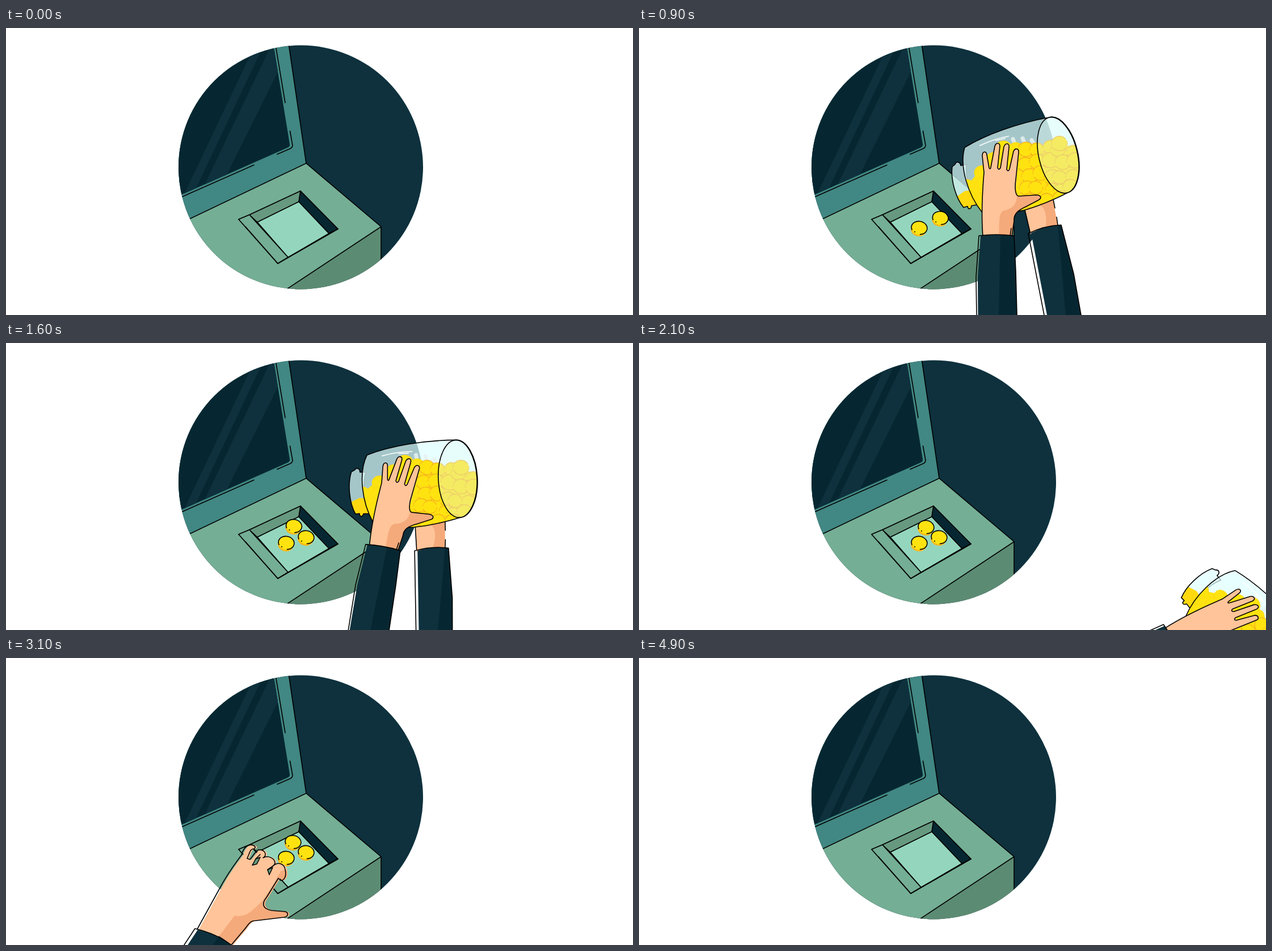
An HTML page for the animation above (5 s loop, 1105 px wide and 507 px high).

```html
<!DOCTYPE html>
<html lang="en">
<head>
<meta charset="utf-8">
<title>Coin tray</title>
<style>
html, body { margin: 0; width: 100%; height: 100%; overflow: hidden; background: #fff; }
svg { display: block; width: 100vw; height: 100vh; }
.ink { fill: none; stroke: #000; stroke-width: 1.6; stroke-linejoin: round; stroke-linecap: round; }
.edge { stroke: #000; stroke-width: 1.5; stroke-linejoin: round; }
</style>
</head>
<body>
<svg id="stage" viewBox="0 0 1105 507"></svg>
<script>
const LOOP = 5000, STEP = 100;
const C = {
  navy: '#0e313d', deep: '#062731', teal: '#418783', top: '#74ae95', side: '#5c8b73',
  wall: '#66997f', floor: '#94d6bd', skin: '#ffc499', shade: '#f5aa7b',
  gold: '#ffe310', rust: '#f5ab21', glass: '#e0ffff'
};
const path = (d, fill, more = '') => `<path d="${d}" fill="${fill}" ${more}/>`;
const ink = (d, more = '') => `<path class="ink" d="${d}" ${more}/>`;

let seed = 7;
const rand = () => (seed = (seed * 16807) % 2147483647) / 2147483647;

const HOLE = 'M410 338L429 330L519 288L585 355L479 416Z';
const SCREEN = 'M290 0H466.5L500 205Q501 209 497 211L290 303Z';

function machine() {
  return `<g clip-path="url(#disc)">
    <rect x="300" y="25" width="440" height="440" fill="${C.navy}"/>
    ${path('M290 0H493.4L529 239L290 353Z', C.teal)}
    ${path(SCREEN, C.deep)}
    <g clip-path="url(#screen)">
      ${path('M440 28L460 18L325 304H309Z', C.navy)}
      ${path('M473 19L500 35L370 298H340Z', C.navy)}
    </g>
    ${path('M529 239L661 351L480 471L290 500V353Z', C.top)}
    ${path('M661 351V480H467Z', C.side)}
    ${ink('M475 30L492 132M500.5 182L505 207Q505 211 501 213L478 223M437 242L305 300.5')}
    ${ink('M497 20L529 239L300 348.5M529 239L661 351L480 471M661 351V480')}
  </g>
  ${path(HOLE, C.deep, 'class="edge"')}
  <path id="back" class="edge" fill="${C.wall}"/>
  <path id="right" class="edge" fill="${C.deep}"/>
  <path id="floor" class="edge" fill="${C.floor}"/>
  <path id="grip" class="edge" fill="${C.top}"/>
  ${ink('M422 351L479 416L585 355')}`;
}

// The outline is open at the lower left, where the milled edge shows
const coin = i => `<g id="coin${i}"><g transform="rotate(12)">
  <ellipse cx="-.5" cy="3.5" rx="13.5" ry="11.5" fill="${C.gold}"/>
  <ellipse cx="-.5" cy="3" rx="12.5" ry="10.8" fill="none" stroke="${C.rust}" stroke-width="3" stroke-dasharray="2.2 1"/>
  <ellipse rx="14" ry="11.5" fill="${C.gold}"/>
  <ellipse class="ink" rx="14" ry="11.5" pathLength="100" stroke-dasharray="20 22 58"/></g>
  <circle cx="-8" cy="7" r="1" fill="#000"/></g>`;

const BODY = 'M574 211C612 188 668 168 723.5 157.7A34.5 68.6 -13 0 1 754.5 291.3' +
  'C735 302 700 316 678 322C650 328 625 327 605 326C580 295 564 245 574 211Z';
const NECK = 'M577 241L567 243C566 236 559 235 557 241L552 245C549 268 558 300 572 317' +
  'L579 315C580 321 585 321 586 314L597 312C583 290 575 265 577 241Z';

function heap() {
  const surface = x => x < 640 ? 208 + (640 - x) * 1.05 : 206;
  const lump = (x, y, r, a) => `<ellipse cx="${x}" cy="${y}" rx="${r}" ry="${r * 0.92}" fill="${C.gold}"
    stroke="${C.rust}" stroke-opacity="${a}" stroke-width="1.8" stroke-dasharray="2 1.4 2 1.4 ${r * 2} 5"/>`;
  let s = path('M556 306L600 252L640 210L700 207L780 209V335H556Z', C.gold);
  for (let x = 584; x < 775; x += 20)
    for (let y = surface(x) + 7; y < 320; y += 23)
      s += lump(x + rand() * 12 - 6, y + rand() * 10 - 4, 12 + rand() * 3, x > 665 ? 0.75 : 0.15);
  return s + lump(741, 204, 14, 0.75);
}

function jar() {
  const base = 'cx="739" cy="224.5" rx="34.5" ry="68.6" transform="rotate(-13 739 224.5)"';
  return `${path(NECK, C.glass, 'fill-opacity=".72"')}
    <g clip-path="url(#neck)">${path('M550 305L574 288L610 284V325H550Z', '#ffd90f')}</g>
    ${ink(NECK)}
    ${path(BODY, C.glass, 'fill-opacity=".72"')}
    <path d="M659 196L664 209M676 195L682 208M692 198L699 210" stroke="#e6f1f0"
      stroke-opacity=".85" stroke-width="7" stroke-linecap="round"/>
    <g clip-path="url(#body)">${heap()}</g>
    <ellipse ${base} fill="#dff8f4" fill-opacity=".36"/>
    <path d="M600 208Q625 196 652 191M628 199L646 195" fill="none" stroke="#fff" stroke-width="1.6"/>
    ${ink(BODY)}<ellipse class="ink" ${base}/>`;
}

const HAND = 'M606 368C603 330 605 290 608 255L605 226C605 217 612 217 613 224L617 247Q619 251 620 246' +
  'L627 209C629 202 636 202 636 209L632 247Q634 252 637 247L643 210C646 202 653 203 652 211' +
  'L648 250Q651 255 653 249L660 218C663 211 670 213 669 220L664 268C662 282 663 296 669 297' +
  'L700 295C709 295 710 301 704 304L683 315C668 322 660 328 661 341L657 368';

function pourArms() {
  const back = `
    ${path('M680 318L690 364L738 350L729 300Z', C.skin)}
    ${path('M706 312Q722 322 716 358L738 350L729 300Z', C.shade)}
    ${ink('M680 322L689 360M730 303L733 318M736 334L738 348')}
    ${path('M691 362Q715 349 744 348L766 434L779 507L852 900H800L719 507Z', C.navy)}
    ${path('M738 348H744L766 434L779 507L852 900H828L752 507Z', C.deep)}
    ${ink('M790 900L714 507L686 363Q714 349 744 348L766 434L779 507L852 900')}`;
  const front = `
    ${path(HAND + 'Z', C.skin)}
    ${path('M634 368C636 345 632 324 645 322C657 319 666 312 666 297L700 295C709 295 710 301 704 304L683 315C668 322 660 328 661 341L657 368Z', C.shade)}
    ${path('M606 340L617 247L620 246L627 209L636 209L632 247L637 247L643 210L652 211L648 250L653 249L660 218L669 220L664 285Z', C.skin)}
    ${ink(HAND)}${ink('M656 354L654 367')}
    ${path('M602 367Q630 363 661 367L664 430L666 507L670 900H602L597.5 507L597 440Z', C.navy)}
    ${path('M637 365L661 367L664 430L666 507L670 900H632L634 507Z', C.deep)}
    ${ink('M600 900L595 507L594 440L599 367Q630 363 661 367L664 430L666 507L670 900')}`;
  return [back, front];
}

const PUSH = 'M337 479L376 408C392 378 405 362 415 348C419 333 428 328 436 331Q442 334 437 337' +
  'C431 337 430 342 428 347L425 354L430 356L439 344C444 335 457 339 457 347Q457 351 453 353' +
  'C462 348 474 354 474 362Q474 365 471 367C480 359 491 364 492 374C495 386 490 393 484 393' +
  'L480 389L459 423C450 434 452 443 468 446L492 448C499 450 497 457 490 458L440 464' +
  'C428 464 426 474 418 482L397 507';

function pushArm() {
  return `<g transform="translate(3 0)">
    ${path(PUSH + 'Z', C.skin)}
    ${path('M372 492L400 455C420 460 433 444 447 431C468 405 475 385 482 376Q489 374 492 374C495 386 490 393 484 393L480 389L459 423C450 434 452 443 468 446L492 448C499 450 497 457 490 458L440 464C428 464 426 474 418 482L397 507Z', C.shade)}
    </g>
    ${path('M440 355L448 352L442 364L434 366ZM461 374L470 370L464 383Z', C.wall, 'class="edge"')}
    ${ink(PUSH)}${ink('M440 355L448 347M461 374L471 367')}
    ${path('M338 480Q371 487 397 507L190 821L131 794Z', C.navy)}
    ${path('M375 491Q388 499 397 507L190 821L160 810Z', C.deep)}
    ${ink('M126 792L333 478Q371 487 397 507L190 821')}`;
}

const [backArm, frontArm] = pourArms();
const stage = document.getElementById('stage');
stage.innerHTML = `<defs>
    <clipPath id="disc"><circle cx="519.5" cy="246" r="215.5"/></clipPath>
    <clipPath id="screen"><path d="${SCREEN}"/></clipPath>
    <clipPath id="hole"><path d="${HOLE}"/></clipPath>
    <clipPath id="neck"><path d="${NECK}"/></clipPath>
    <clipPath id="body"><path d="${BODY}"/></clipPath>
  </defs>
  ${machine()}
  <g id="coins">${[2, 1, 0].map(coin).join('')}</g>
  <g id="pour">${backArm}${jar()}${frontArm}</g>
  <g id="push">${pushArm()}</g>`;
const el = id => document.getElementById(id);

// time, x, y, angle
const POUR = [
  [200, 975, 590, 58], [400, 860, 375, 30], [600, 690, 236, -2], [700, 668, 251, -3],
  [900, 670, 250, 0], [1300, 712, 240, 7], [1500, 720, 251, 9], [1600, 724, 253, 10],
  [1900, 905, 352, 35], [2100, 1061, 505, 62], [2300, 1220, 680, 85]
];
const PRESS = [
  [2600, 760, 540, -25], [2700, 655, 430, -20], [2900, 485, 340, -6], [3100, 440, 390, 0],
  [3700, 446.5, 376, 7.3], [4100, 446.5, 376, 7.3], [4400, 442, 388, 1],
  [4700, 290, 510, -3], [4900, 200, 620, -5]
];
const COINS = [
  { from: [556, 292], rest: [494, 353], fall: [600, 800], end: [592, 352], slide: [3150, 3850] },
  { from: [556, 296], rest: [529, 343], fall: [740, 930], end: [592, 342], slide: [3150, 3650] },
  { from: [575, 284], rest: [506, 325], fall: [1150, 1620], end: [572, 318], slide: [3150, 3650] }
];

const clamp = v => Math.max(0, Math.min(1, v));
const mix = (a, b, k) => a + (b - a) * k;
const smooth = v => (v = clamp(v), v * v * (3 - 2 * v));

// Cubic through the keys, flat wherever a value turns or rests
function pose(keys, t) {
  const i = Math.max(0, Math.min(keys.length - 2, keys.findIndex(k => k[0] > t) - 1));
  const a = keys[i], b = keys[i + 1], d = b[0] - a[0], s = clamp((t - a[0]) / d);
  const slope = (j, n) => {
    const p = keys[j - 1], k = keys[j], q = keys[j + 1];
    if (!p || !q) return (b[n] - a[n]) / d;
    return (k[n] - p[n]) * (q[n] - k[n]) > 0 ? (q[n] - p[n]) / (q[0] - p[0]) : 0;
  };
  return [1, 2, 3].map(n => {
    const u = 1 - s;
    return a[n] * (1 + 2 * s) * u * u + b[n] * s * s * (3 - 2 * s)
      + d * (slope(i, n) * s * u * u - slope(i + 1, n) * s * s * u);
  });
}

function place(id, keys, px, py, t) {
  const on = t >= keys[0][0] && t < keys[keys.length - 1][0];
  el(id).setAttribute('display', on ? 'inline' : 'none');
  if (!on) return;
  const [x, y, a] = pose(keys, t);
  el(id).setAttribute('transform', `translate(${x} ${y}) rotate(${a}) translate(${-px} ${-py})`);
}

function tray(k) {
  const at = (x0, y0, x1, y1) => `${mix(x0, x1, k)} ${mix(y0, y1, k)}`;
  const bl = at(443, 343, 452, 331), br = at(516, 307, 515, 318);
  const fr = at(569, 363, 563, 367), fl = at(497, 405, 504, 401);
  const hinge = at(429, 330, 436, 324);
  el('back').setAttribute('d', `M429 330L519 288L${br}L${bl}Z`);
  el('right').setAttribute('d', `M519 288L585 355L${fr}L${br}Z`);
  el('floor').setAttribute('d', `M${bl}L${br}L${fr}L${fl}Z`);
  el('grip').setAttribute('d', `M${at(410, 338, 419, 328)}L${hinge}L${fl}L${at(479, 416, 484, 413)}Z`);
}

function draw(t) {
  tray(smooth((t - 3100) / 600) - smooth((t - 4100) / 300));
  COINS.forEach((c, i) => {
    const f = clamp((t - c.fall[0]) / (c.fall[1] - c.fall[0]));
    const s = clamp((t - c.slide[0]) / (c.slide[1] - c.slide[0]));
    const x = mix(mix(c.from[0], c.rest[0], Math.sqrt(f)), c.end[0], s);
    const y = mix(mix(c.from[1], c.rest[1], f), c.end[1], s);
    const node = el('coin' + i);
    node.setAttribute('display', f > 0 && s < 1 ? 'inline' : 'none');
    node.setAttribute('transform', `translate(${x} ${y})`);
  });
  if (t > 3100) el('coins').setAttribute('clip-path', 'url(#hole)');
  else el('coins').removeAttribute('clip-path');
  place('pour', POUR, 670, 250, t);
  place('push', PRESS, 440, 390, t);
}

const start = performance.now();
function tick() {
  const t = (performance.now() - start) % LOOP;
  draw(Math.floor(t / STEP) * STEP);
  requestAnimationFrame(tick);
}
tick();
</script>
</body>
</html>
```
